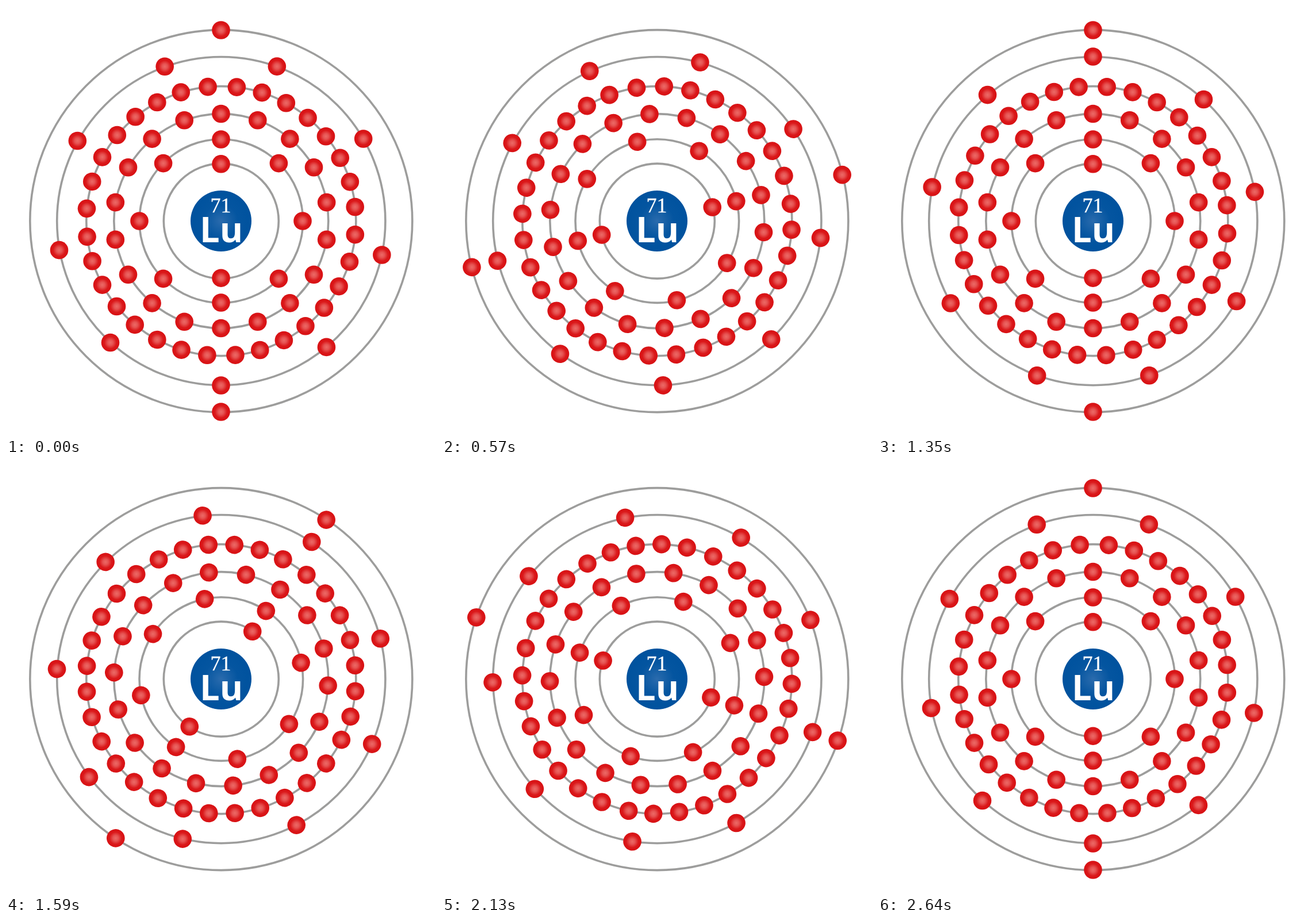
These frames come from a looping animation (748 px wide and 748 px high, 2.67 s). An HTML page:

```html
<!DOCTYPE html>
<html lang="en">
<head>
<meta charset="utf-8">
<title>Electron shells</title>
<style>
  html, body { margin: 0; width: 100%; height: 100%; overflow: hidden; background: #fff; }
  svg { display: block; width: 100%; height: 100%; }
  text { fill: #fff; }
  .number { font: 36px "Liberation Serif", "Times New Roman", serif; stroke: #fff; stroke-width: .4px; }
  .symbol { font: 900 61.5px "Noto Sans", "Open Sans", sans-serif; font-stretch: 62.5%; }
</style>
</head>
<body>
<svg viewBox="0 0 748 748">
  <defs>
    <radialGradient id="red">
      <stop offset="0" stop-color="#ec6a66"/>
      <stop offset=".3" stop-color="#e65352"/>
      <stop offset=".68" stop-color="#da1719"/>
      <stop offset="1" stop-color="#d81114"/>
    </radialGradient>
    <radialGradient id="blue">
      <stop offset="0" stop-color="#2a6bad"/>
      <stop offset=".55" stop-color="#0455a0"/>
      <stop offset="1" stop-color="#00529e"/>
    </radialGradient>
  </defs>
  <g id="rings" fill="none" stroke="#9d9d9c" stroke-width="3.6"></g>
  <g id="electrons" fill="url(#red)"></g>
  <circle cx="374" cy="374" r="53" fill="url(#blue)"/>
  <text class="number" x="355.5" y="359">71</text>
  <text class="symbol" x="374.5" y="411" text-anchor="middle">Lu</text>
</svg>
<script>
const CENTER = 374, STEP = 30, FRAMES = 89, HALF = 45;
const even = n => Array.from({ length: n }, (_, i) => i * 360 / n);

// Angles run clockwise from the top, in degrees.
const shells = [
  { r: 100, orbit: 99.2, angles: even(2) },
  { r: 142.3, orbit: 142, angles: even(8) },
  { r: 186.5, orbit: 186.5, angles: even(18) },
  { r: 234.5, orbit: 234.5, angles: [
    6.7, 17.7, 28.9, 40.1, 51.1, 62.1, 73.1, 84,
    95.8, 107.6, 119, 130.1, 141.2, 152.2, 163.2, 173.9,
    185.9, 197.1, 208.3, 219.7, 230.7, 241.7, 252.7, 263.3,
    275.3, 287, 298.3, 309.6, 320.6, 331.7, 342.7, 354.4] },
  { r: 285.6, orbit: 286, angles: [19.9, 60, 101.9, 140.1, 180, 222.3, 259.8, 299.2, 340] },
  { r: 332.5, orbit: 332, angles: even(2) }
];

const rings = document.getElementById("rings");
const electrons = document.getElementById("electrons");

function circle(parent, cx, cy, r) {
  const el = document.createElementNS("http://www.w3.org/2000/svg", "circle");
  const attrs = { cx, cy, r };
  for (const key in attrs) el.setAttribute(key, attrs[key]);
  parent.append(el);
}

for (const { r, orbit, angles } of shells) {
  circle(rings, CENTER + .3, CENTER + .1, r);
  for (const angle of angles) {
    const a = angle * Math.PI / 180;
    circle(electrons, CENTER + orbit * Math.sin(a), CENTER - orbit * Math.cos(a), 15.8);
  }
}

// The second half turn takes slightly less time than the first.
function turn(frame) {
  return frame < HALF
    ? 180 * frame / HALF
    : 180 + 180 * (frame - HALF) / (FRAMES - 1 - HALF);
}

function draw(time) {
  const frame = Math.floor(time / STEP) % FRAMES;
  electrons.setAttribute("transform", `rotate(${turn(frame)} ${CENTER} ${CENTER})`);
}

function tick() {
  draw(performance.now());
  requestAnimationFrame(tick);
}
tick();
</script>
</body>
</html>
```
